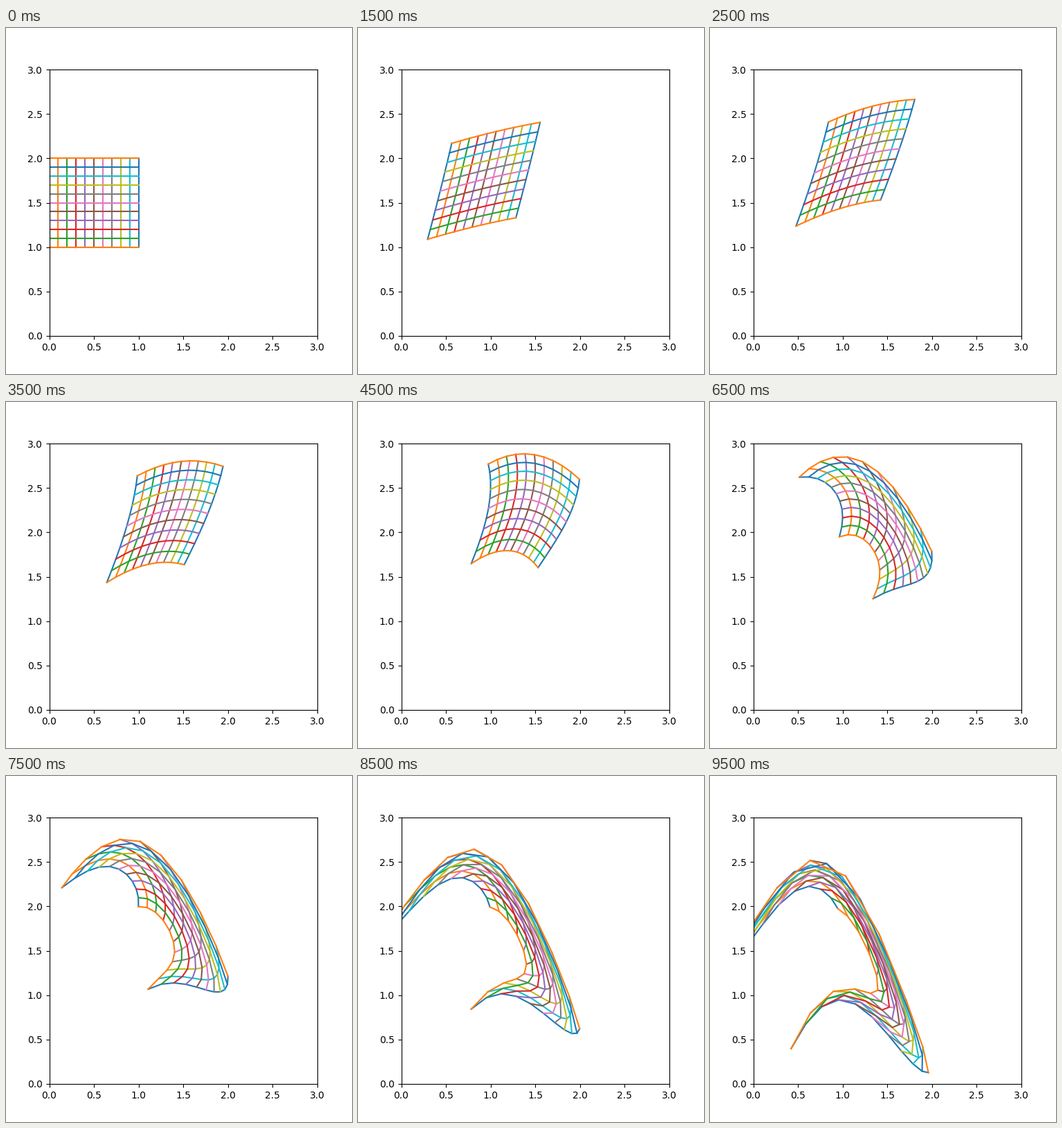
Write a matplotlib script that moves like this. It is 500 px wide and 500 px high and loops after 10 s.

```python
import numpy as np
import matplotlib.pyplot as plt
from matplotlib.animation import FuncAnimation

FRAMES = 20
INTERVAL = 500
TIME_STEP = 0.1

steps = np.linspace(0, 1, 11)
grid_x, grid_y = np.meshgrid(steps, steps + 1)  # rows share y, columns share x

fig, ax = plt.subplots(figsize=(5, 5), dpi=100)
ax.set_xlim(0, 3)
ax.set_ylim(0, 3)

columns = [ax.plot([], [])[0] for _ in steps]
rows = [ax.plot([], [])[0] for _ in steps]


def warp(x, y, t):
    """Shear alternately along y, x and y; the identity at t = 0."""
    y = y + np.cos(t * x) - 1
    x = x + np.sin(t * y)
    y = y + np.sin(t * x)
    return x, y


def update(frame):
    x, y = warp(grid_x, grid_y, frame * TIME_STEP)
    for i, (column, row) in enumerate(zip(columns, rows)):
        column.set_data(x[:, i], y[:, i])
        row.set_data(x[i], y[i])
    return columns + rows


anim = FuncAnimation(fig, update, frames=FRAMES, interval=INTERVAL,
                     repeat=True, repeat_delay=0)
plt.show()
```
